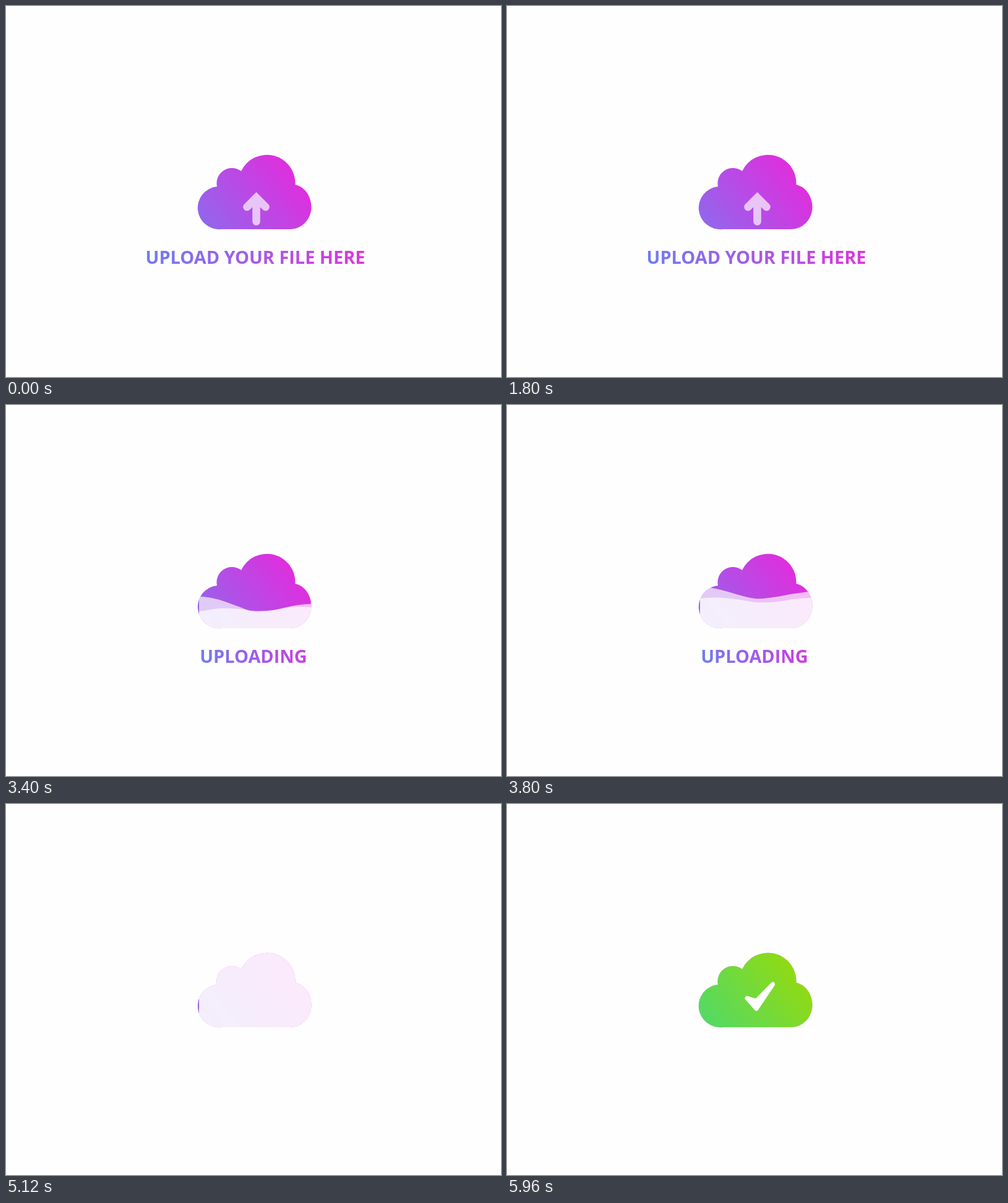
Write an HTML page that moves like this. It is 800 px wide and 600 px high and loops after 6.76 s.

```html
<!DOCTYPE html>
<html lang="en">
<head>
<meta charset="utf-8">
<title>Upload</title>
<style>
  html, body { margin: 0; width: 100%; height: 100%; overflow: hidden; background: #fefefe; }
  svg { display: block; width: 100vw; height: 100vh; }
  text { font: 700 28.9px "Open Sans", sans-serif; text-anchor: middle; }
</style>
</head>
<body>
<svg viewBox="0 0 800 600">
  <defs>
    <linearGradient id="violet" gradientUnits="userSpaceOnUse" x1="325" y1="350" x2="452" y2="252">
      <stop stop-color="#9564ec"/><stop offset="1" stop-color="#de2fdd"/>
    </linearGradient>
    <linearGradient id="green" gradientUnits="userSpaceOnUse" x1="325" y1="350" x2="455" y2="255">
      <stop stop-color="#55d962"/><stop offset="1" stop-color="#90da14"/>
    </linearGradient>
    <linearGradient id="promptInk" gradientUnits="userSpaceOnUse" x1="227" x2="580" y1="0" y2="0">
      <stop stop-color="#6f7df1"/><stop offset="1" stop-color="#de34dc"/>
    </linearGradient>
    <linearGradient id="statusInk" gradientUnits="userSpaceOnUse" x1="314" x2="486" y1="0" y2="0">
      <stop stop-color="#6f7df1"/><stop offset="1" stop-color="#cc3ee0"/>
    </linearGradient>
    <path id="cloud" d="M348 361A34.5 34.5 0 0 1 341 292A24.7 24.7 0 0 1 380 267A46 46 0 0 1 467.5 289
      C482 292 493.5 307 493.5 325C493.5 345 478 361 459 361Z"/>
    <clipPath id="inside"><use href="#cloud"/></clipPath>
  </defs>
  <use href="#cloud" fill="url(#violet)"/>
  <path id="arrow" d="M389.5 325L404.5 310L419.5 325M404.5 318V348.5" fill="none" stroke="#fff"
    stroke-width="12.6" stroke-linecap="round"/>
  <g clip-path="url(#inside)" fill="#fff" fill-opacity=".68">
    <path id="waveA"/><path id="waveB"/>
  </g>
  <text id="prompt" x="403" y="417.3" fill="url(#promptInk)">UPLOAD YOUR FILE HERE</text>
  <text id="status" x="400" y="417.3" fill="url(#statusInk)">UPLOADING</text>
  <use id="done" href="#cloud" fill="url(#green)"/>
  <path id="check" d="M388 314L403 318.5L429.5 291.5L403 331Z" fill="#fff" stroke="#fff"
    stroke-width="7" stroke-linejoin="round"/>
</svg>
<script>
const LOOP = 6760, STEP = 40;
const el = id => document.getElementById(id);
const ramp = (t, from, to) => Math.min(1, Math.max(0, (t - from) / (to - from)));
const ease = p => p < .5 ? 4 * p ** 3 : 1 - 4 * (1 - p) ** 3;
const backOut = p => 1 + 2.4 * (p - 1) ** 3 + 1.4 * (p - 1) ** 2;
const shift = (ys, d) => ys.map(y => y + d);

// Wave heights at x = 313, 343 ... 493 for each time in waveTimes
const waveTimes = [2600, 2880, 3400, 4240, 5120];
const withEnds = (poses, rise) => [shift(poses[0], 22), ...poses, shift(poses[2], -rise)];
const waves = {
  waveA: withEnds([
    [342.5, 340.3, 345, 354, 360.3, 356, 350],
    [309.5, 314.5, 325, 334.7, 331.5, 325, 321.5],
    [276, 280.5, 286.5, 289.5, 287.5, 283.5, 280]], 62),
  waveB: withEnds([
    [348.5, 347, 354, 352, 343, 340, 342],
    [333.7, 329, 329.5, 333, 331.7, 326.5, 327],
    [289, 292, 298, 304, 304, 300, 295]], 67)
};

function wavePath(poses, t) {
  let k = 0;
  while (k < 3 && t > waveTimes[k + 1]) k++;
  const p = ramp(t, waveTimes[k], waveTimes[k + 1]);
  const ys = poses[k].map((y, i) => y + (poses[k + 1][i] - y) * p);
  const slope = i => ((ys[i + 1] ?? ys[i]) - (ys[i - 1] ?? ys[i])) / 6;
  let d = `M313 ${ys[0]}`;
  for (let i = 1; i < ys.length; i++) {
    const x = 313 + 30 * i;
    d += `C${x - 20} ${ys[i - 1] + slope(i - 1)} ${x - 10} ${ys[i] - slope(i)} ${x} ${ys[i]}`;
  }
  return d + 'H495V365H312V' + ys[0] + 'Z';
}

function draw(now) {
  const t = Math.floor(now % LOOP / STEP) * STEP;

  const lift = ease(ramp(t, 80, 440)) - ease(ramp(t, 840, 1320)) + ease(ramp(t, 1760, 2280));
  const leaving = 1 - ramp(t, 2600, 2840);
  el('arrow').setAttribute('transform', `translate(0 ${-17 * lift})`);
  el('arrow').setAttribute('opacity', .68 * leaving);
  el('prompt').setAttribute('opacity', leaving);
  el('status').setAttribute('opacity', ramp(t, 2920, 3280) - ramp(t, 4640, 5040));

  for (const id in waves) el(id).setAttribute('d', wavePath(waves[id], t));

  el('done').setAttribute('opacity', ramp(t, 5240, 5520));
  const pop = t > 5640 ? backOut(ramp(t, 5640, 5960)) : 0;
  el('check').setAttribute('transform', `translate(408.5 311.5) scale(${pop}) translate(-408.5 -311.5)`);

  requestAnimationFrame(draw);
}
requestAnimationFrame(draw);
</script>
</body>
</html>
```
